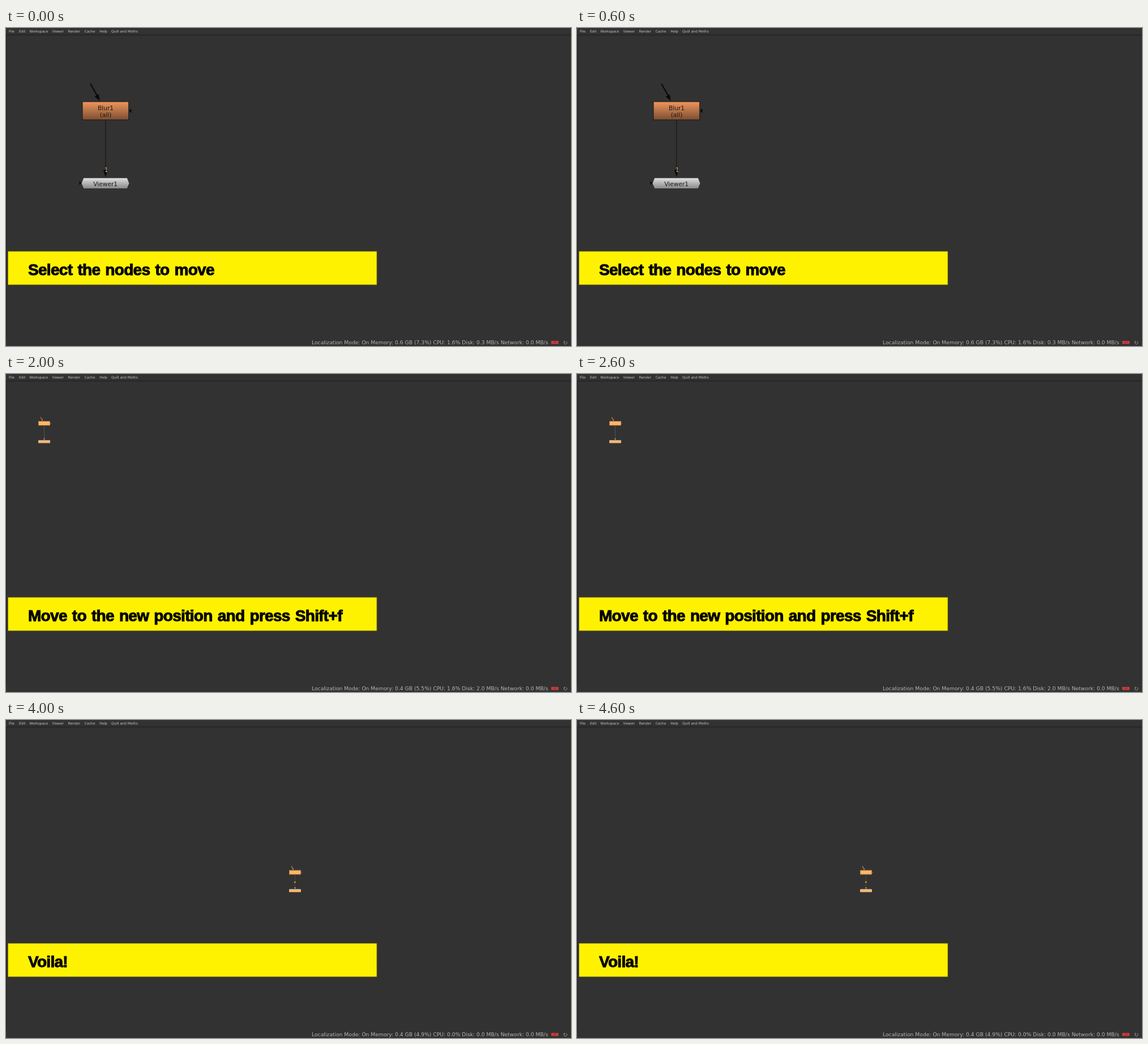
Write an HTML page that moves like this. It is 998x561 px and loops after 5 s.

```html
<!DOCTYPE html>
<html lang="en">
<head>
<meta charset="utf-8">
<title>Moving nodes</title>
<style>
  html, body { margin: 0; width: 100%; height: 100%; overflow: hidden; background: #323232; }
  svg { display: block; width: 998px; height: 561px; }
  text { font-family: "DejaVu Sans", Verdana, sans-serif; white-space: pre; }
  .menu text { font-size: 6px; fill: #c6c6c6; }
  .status text { font-size: 9.2px; fill: #b5b5b5; }
  .label text { font-size: 10.6px; fill: #1d1710; text-anchor: middle; }
  .banner text {
    font: bold 28px "Liberation Sans", Arial, sans-serif;
    letter-spacing: -.7px; word-spacing: 2px;
    fill: #000; stroke: #000; stroke-width: 1px;
  }

  /* Each part is shown for one or two seconds, starting at second --at */
  .one, .two {
    visibility: hidden;
    animation: one 5s step-end infinite;
    animation-delay: calc((var(--at) - 5) * 1s);
  }
  .two { animation-name: two; }
  @keyframes one { 0% { visibility: visible; } 20%, 100% { visibility: hidden; } }
  @keyframes two { 0% { visibility: visible; } 40%, 100% { visibility: hidden; } }
</style>
</head>
<body>
<svg viewBox="0 0 998 561">
  <defs>
    <linearGradient id="orange" x2="0" y2="1">
      <stop stop-color="#f0965c"/><stop offset="1" stop-color="#7c4e33"/>
    </linearGradient>
    <linearGradient id="silver" x2="0" y2="1">
      <stop stop-color="#e2e2e2"/><stop offset="1" stop-color="#868686"/>
    </linearGradient>
    <g id="arrows" fill="currentColor">
      <path d="M149 98L162 121" stroke="currentColor" stroke-width="2"/>
      <path d="M166 128.5L156.5 121L163.5 117Z"/>
      <path d="M217.5 146L221.5 142V150Z"/>
      <path d="M175.7 262.5L171.8 250.5H179.6Z"/>
    </g>
    <path id="hexagon" d="M133 274L137 264.3H214L218 274L214 283.5H137Z"/>
    <path id="plug" d="M133 273.5L129.5 270V277Z"/>
    <g id="mini">
      <rect x="57.5" y="83.5" width="20" height="7" fill="#fdb768" stroke="#c27c48"/>
      <rect x="57" y="117" width="21" height="5" rx="1" fill="#fdb768"/>
      <path d="M57.5 117.3H77.5" stroke="#d5cabb"/>
      <path d="M57.5 121.7H77.5" stroke="#a78868" stroke-width=".7"/>
      <path d="M61 76L64.5 82" stroke="currentColor" stroke-width="1.2"/>
      <path d="M65.3 83.3L62.7 80.8L64.7 79.6ZM78 87L79.5 86V88Z" fill="currentColor"/>
    </g>
  </defs>

  <rect width="998" height="561" fill="#323232"/>
  <path d="M0 12.3H998M.5 12V548" fill="none" stroke="#1d1d1d"/>

  <g class="menu">
    <text x="5" y="8.2">File</text>
    <text x="23" y="8.2">Edit</text>
    <text x="41.3" y="8.2">Workspace</text>
    <text x="81.5" y="8.2">Viewer</text>
    <text x="109.5" y="8.2">Render</text>
    <text x="138.7" y="8.2">Cache</text>
    <text x="165.2" y="8.2">Help</text>
    <text x="186" y="8.2">Quill and Moths</text>
  </g>

  <!-- Plain nodes -->
  <g class="one" style="--at:0">
    <path d="M175.7 163V251" stroke="#1b1b1b" stroke-width="1.4"/>
    <use href="#arrows" color="#080808"/>
    <use href="#plug" fill="#080808"/>
    <rect x="135" y="130" width="81.7" height="32" fill="url(#orange)" stroke="#171717"/>
    <use href="#hexagon" fill="url(#silver)" stroke="#222" stroke-width=".8"/>
    <text x="174" y="254" font-size="9.6" fill="#edb56c">1</text>
  </g>

  <!-- Selected nodes -->
  <g class="one" style="--at:1">
    <rect x="125.5" y="91.5" width="253" height="223" fill="#484848" stroke="#c9c9c9"/>
    <path d="M175.7 163V251" stroke="#c3985d" stroke-width="1.3" stroke-dasharray="1 1"/>
    <text x="174" y="254" font-size="9.6" fill="#eee">1</text>
    <use href="#arrows" color="#fdc176"/>
    <use href="#plug" fill="#111"/>
    <rect x="135" y="130" width="81.7" height="32" fill="url(#orange)" stroke="#5a3d2c" stroke-width=".6"/>
    <rect x="137" y="132" width="78" height="28" fill="#fec278"/>
    <use href="#hexagon" fill="#fec278" stroke="#333" stroke-width=".6"/>
    <path d="M134.2 274L137.7 265.3H213.3L216.8 274L213.3 282.5H137.7Z" fill="#fec278" stroke="url(#silver)" stroke-width="2"/>
  </g>

  <g class="two label" style="--at:0">
    <text x="176" y="144.8">Blur1</text>
    <text x="176" y="157.3">(all)</text>
    <text x="175.7" y="278.8">Viewer1</text>
  </g>

  <!-- Zoomed out -->
  <g class="one" style="--at:2">
    <path d="M67.5 91V115" stroke="#555" stroke-width=".9"/>
    <path d="M67.5 116.7L66.3 113.7H68.7Z" fill="#d9b993"/>
    <use href="#mini" color="#c97f45"/>
  </g>
  <g class="two" style="--at:3">
    <g transform="translate(443 181.7)">
      <path d="M67.5 91V115" stroke="#66503f" stroke-width=".9" stroke-dasharray="2 1"/>
      <path d="M67.5 116.7L66.2 113.5H68.8Z" fill="#ee9b70"/>
      <circle cx="67.3" cy="104.3" r="1.3" fill="#e8c322"/>
      <use href="#mini" color="#bd9445"/>
    </g>
  </g>

  <g class="banner">
    <rect x="3.5" y="394" width="651.5" height="59" fill="#fff200" stroke="#77710a" stroke-width=".8"/>
    <text class="two" style="--at:0" x="39" y="435.8">Select the nodes to move</text>
    <text class="two" style="--at:2" x="39" y="435.8">Move to the new position and press Shift+f</text>
    <text class="one" style="--at:4" x="39" y="435.8">Voila!</text>
  </g>

  <g class="status">
    <text class="one" style="--at:0" x="540" y="558.3">Localization Mode: On Memory: 0.6 GB (7.3%) CPU: 1.6% Disk: 0.3 MB/s Network: 0.0 MB/s</text>
    <text class="one" style="--at:1" x="540" y="558.3">Localization Mode: On Memory: 0.4 GB (5.2%) CPU: 1.6% Disk: 0.0 MB/s Network: 0.0 MB/s</text>
    <text class="one" style="--at:2" x="540" y="558.3">Localization Mode: On Memory: 0.4 GB (5.5%) CPU: 1.6% Disk: 2.0 MB/s Network: 0.0 MB/s</text>
    <text class="two" style="--at:3" x="540" y="558.3">Localization Mode: On Memory: 0.4 GB (4.9%) CPU: 0.0% Disk: 0.0 MB/s Network: 0.0 MB/s</text>
  </g>
  <rect x="963" y="552" width="13" height="5.6" rx=".8" fill="#c73c3c"/>
  <text x="969.5" y="556.4" font-size="4" fill="#7c2626" text-anchor="middle">off</text>
  <path d="M989.5 552.8A2.7 2.7 0 1 1 986.2 553.2M986.2 551.8V553.6H988" fill="none" stroke="#a5a5a5" stroke-width=".9"/>
</svg>
</body>
</html>
```
